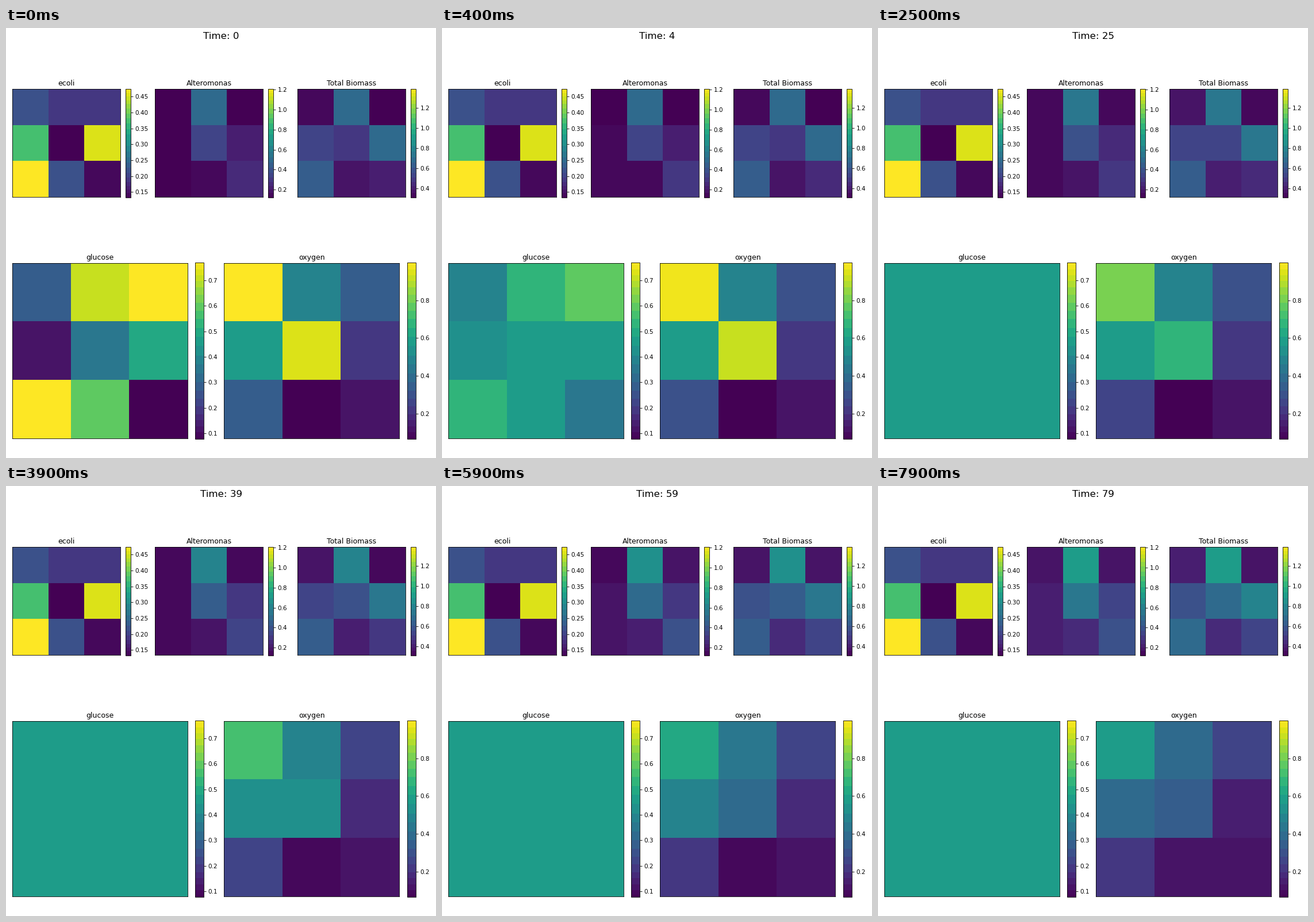
A matplotlib script for the animation above (8000 ms loop, 748 by 748 pixels).

```python
import numpy as np
import matplotlib.pyplot as plt
from matplotlib.animation import FuncAnimation
from matplotlib.colors import ListedColormap
from matplotlib.ticker import MultipleLocator

SIZE, DPI = 748, 74.8
STEPS, INTERVAL = 80, 100
GROWTH, DIFFUSION = 0.005, 0.125
SHADES = 25

# Starting biomass
ECOLI = np.array([[.216, .184, .184], [.38, .133, .454], [.4744, .222, .145]])
ALTER = np.array([[.122, .486, .13], [.134, .36, .23], [.135, .16, .275]])

# Nutrients, as fractions of their colour range
GLUCOSE = np.array([[.32, .90, 1], [.06, .39, .59], [1, .77, 0]])
OXYGEN = np.array([[1, .47, .28], [.57, .95, .15], [.28, 0, .07]])
OXYGEN_END = np.array([[.56, .37, .19], [.37, .28, .10], [.145, .06, .05]])

# Edge cells are fed by their neighbours, so their oxygen changes late
LATE = np.indices((3, 3)).sum(axis=0) % 2 == 1

# Rows of panels: (left, top, pitch, side, bar gap, bar width), then
# (name, lowest value, highest value, tick step) for each panel
ROWS = [
    ((11.2, 106.3, 248, 187.9, 9, 9.1),
     [("ecoli", .133, .4744, .05),
      ("Alteromonas", .1224, 1.2086, .2),
      ("Total Biomass", .311, 1.391, .2)]),
    ((11, 409, 368.4, 304.8, 13.5, 15.1),
     [("glucose", 0.0786, .769, .1),
      ("oxygen", .066, .9997, .2)]),
]
RANGE = {name: (lo, hi) for _, row in ROWS for name, lo, hi, _ in row}


def stepped_viridis():
    """Viridis cut into shades that lie closer together near both ends."""
    u = np.linspace(0, 1, SHADES)
    levels = (u + u * u * (3 - 2 * u)) / 2
    ramp = np.linspace(0, 1, 256)
    nearest = np.abs(ramp[:, None] - levels).argmin(axis=1)
    return ListedColormap(plt.get_cmap("viridis")(levels[nearest]))


def diffuse(grid, steps):
    for _ in range(steps):
        p = np.pad(grid, 1, mode="edge")
        around = p[:-2, 1:-1] + p[2:, 1:-1] + p[1:-1, :-2] + p[1:-1, 2:]
        grid = grid + DIFFUSION * (around - 4 * grid)
    return grid


def consume(t):
    s = t / (STEPS - 1)
    progress = np.where(LATE, s ** 2, 1 - (1 - s) ** 1.6)
    return OXYGEN + (OXYGEN_END - OXYGEN) * progress


def scaled(name, fraction):
    lo, hi = RANGE[name]
    return lo + (hi - lo) * fraction


def state(t):
    alter = ALTER * np.exp(GROWTH * t)
    return {
        "ecoli": ECOLI,
        "Alteromonas": alter,
        "Total Biomass": ECOLI + alter,
        "glucose": scaled("glucose", diffuse(GLUCOSE, t)),
        "oxygen": scaled("oxygen", consume(t)),
    }


fig = plt.figure(figsize=(SIZE / DPI, SIZE / DPI), dpi=DPI, facecolor="white")


def add_axes(x, y, width, height):
    return fig.add_axes([x / SIZE, 1 - (y + height) / SIZE,
                         width / SIZE, height / SIZE])


cmap = stepped_viridis()
images = {}
for (left, top, pitch, side, gap, bar), row in ROWS:
    for i, (name, lo, hi, step) in enumerate(row):
        x = left + i * pitch
        ax = add_axes(x, top, side, side)
        images[name] = ax.imshow(state(0)[name], cmap=cmap, vmin=lo, vmax=hi,
                                 aspect="auto", interpolation="nearest")
        ax.set(xticks=[], yticks=[])
        ax.set_title(name, fontsize=12)
        over = 0.003 * side
        cax = add_axes(x + side + gap, top - over, bar, side + 2 * over)
        fig.colorbar(images[name], cax=cax, ticks=MultipleLocator(step))

clock = fig.text(0.5, 1 - 19 / SIZE, "", fontsize=16, ha="center", va="baseline")


def update(t):
    for name, grid in state(t).items():
        images[name].set_data(grid)
    clock.set_text(f"Time: {t}")
    return [*images.values(), clock]


anim = FuncAnimation(fig, update, frames=STEPS, interval=INTERVAL,
                     repeat=True, repeat_delay=0)
plt.show()
```
